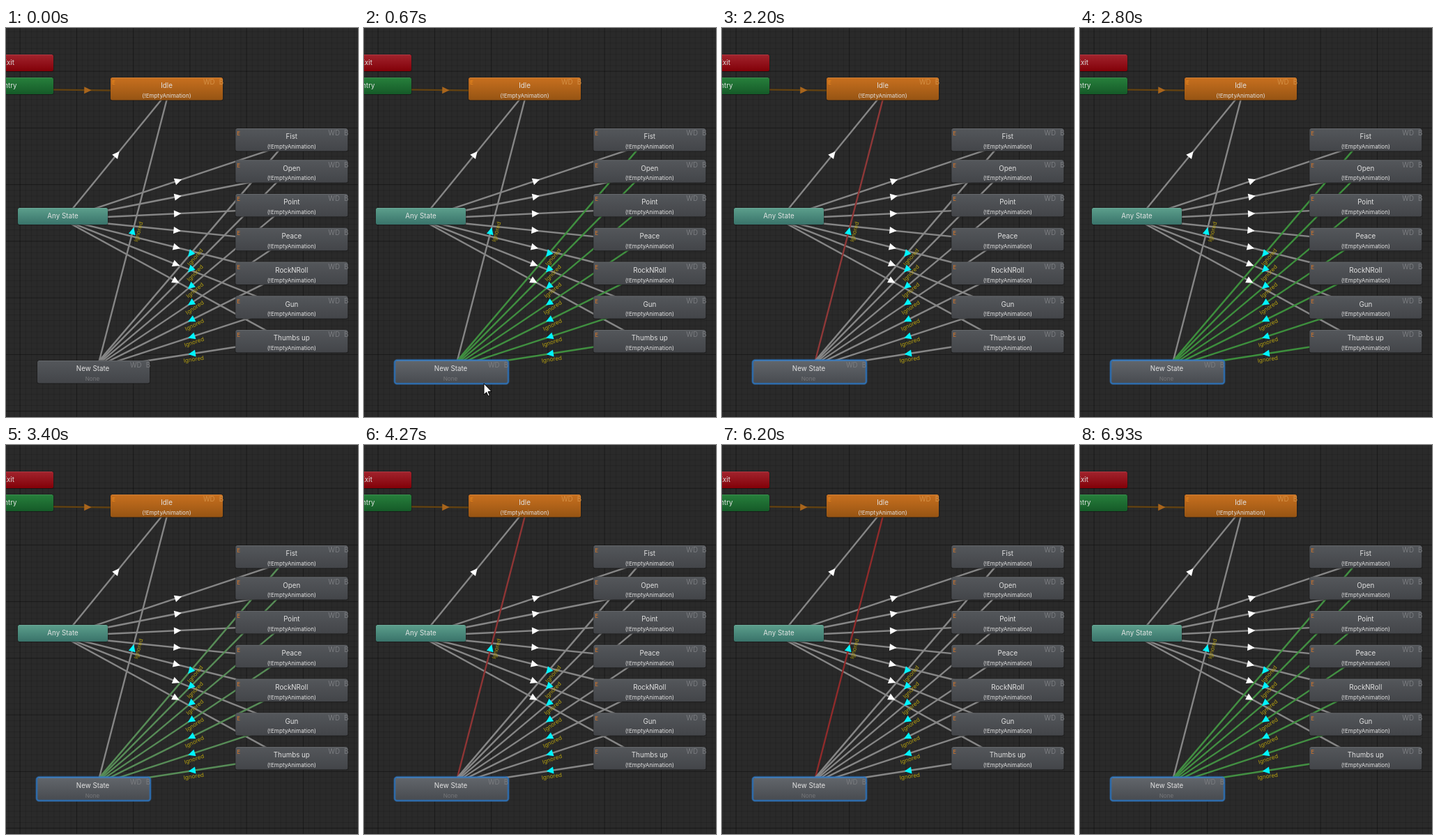
Animation of 505x558 px, one loop 7000 ms. Source, as an HTML page with a canvas:

```html
<!DOCTYPE html>
<html lang="en">
<head>
<meta charset="utf-8">
<title>State graph</title>
<style>
  html, body { margin: 0; width: 100%; height: 100%; overflow: hidden; background: #2a2a2a; }
  canvas { display: block; }
</style>
</head>
<body>
<canvas id="stage" width="505" height="558"></canvas>
<script>
const W = 505, H = 558, LOOP = 7000, STEP = 200 / 3;
const ZOOM = 0.8125;
const SELECT_STEP = 7;
const PULSE = 2094.4, PULSE_START = 376;
const FONT = 'Inter, Roboto, sans-serif';
const GREY = [134, 134, 134], GREEN = [54, 144, 54], RED = [144, 42, 42];
const ctx = document.getElementById('stage').getContext('2d');

const FILLS = {
  grey: ['#54575b', '#434549'],
  lit: ['#62666b', '#484b50'],
  orange: ['#c8701f', '#965413'],
  teal: ['#5c9f8c', '#39736a'],
  green: ['#27803c', '#155a28'],
  red: ['#a2242e', '#820008']
};

const state = (name, x, y, fill = 'grey', sub = '(!EmptyAnimation)') =>
  ({ name, x, y, w: 161, h: 32.5, fill, sub });
const pill = (name, x, y, fill) => ({ name, x, y, w: 129, h: 24, fill });

const idle = state('Idle', 150, 71, 'orange');
const anyState = pill('Any State', 17, 258, 'teal');
const newState = state('New State', 45, 477, 'grey', 'None');
const exit = pill('Exit', -61, 38, 'red');
const entry = pill('Entry', -61, 71, 'green');
const hands = ['Fist', 'Open', 'Point', 'Peace', 'RockNRoll', 'Gun', 'Thumbs up']
  .map((name, i) => state(name, 329.3, i ? 189.3 + (i - 1) * 48.75 : 144));
const nodes = [exit, entry, idle, anyState, newState, ...hands];

const center = n => [n.x + n.w / 2, n.y + n.h / 2];

// An edge joins two centres, shifted to the right of its direction.
function edge(from, to, kind) {
  const [ax, ay] = center(from), [bx, by] = center(to);
  const angle = Math.atan2(by - ay, bx - ax);
  const ox = -Math.sin(angle) * 4.06, oy = Math.cos(angle) * 4.06;
  return { kind, angle, x1: ax + ox, y1: ay + oy, x2: bx + ox, y2: by + oy };
}
const edges = [
  edge(anyState, idle, 'any'),
  ...hands.map(n => edge(anyState, n, 'any')),
  edge(newState, idle, 'out'),
  ...hands.map(n => edge(n, newState, 'in'))
];

const rgb = c => `rgb(${c.map(Math.round).join(',')})`;
const mix = (a, b, k) => a.map((v, i) => v + (b[i] - v) * k);

function text(str, x, y, size, color, align = 'center') {
  ctx.font = `${size}px ${FONT}`;
  ctx.fillStyle = color;
  ctx.textAlign = align;
  ctx.textBaseline = 'alphabetic';
  ctx.fillText(str, x, y + size * 0.36);
}

function line(x1, y1, x2, y2, color, width) {
  ctx.strokeStyle = color;
  ctx.lineWidth = width;
  ctx.beginPath();
  ctx.moveTo(x1, y1);
  ctx.lineTo(x2, y2);
  ctx.stroke();
}

function arrow(x, y, angle, color) {
  ctx.save();
  ctx.translate(x, y);
  ctx.rotate(angle);
  ctx.fillStyle = color;
  ctx.beginPath();
  ctx.moveTo(5.5, 0);
  ctx.lineTo(-4.8, -5);
  ctx.lineTo(-4.8, 5);
  ctx.fill();
  ctx.restore();
}

function gridLines(gap, color) {
  for (let x = 263.9 % gap; x < W; x += gap) line(x, 0, x, H, color, 1);
  for (let y = 143.4 % gap; y < H; y += gap) line(0, y, W, y, color, 1);
}

function drawGrid() {
  ctx.fillStyle = '#2a2a2a';
  ctx.fillRect(0, 0, W, H);
  gridLines(10 * ZOOM, 'rgba(0,0,0,.13)');
  gridLines(100 * ZOOM, 'rgba(0,0,0,.3)');
}

function ignoredLabel(x, y, angle) {
  ctx.save();
  ctx.translate(x, y);
  ctx.rotate(Math.cos(angle) < 0 ? angle - Math.PI : angle);
  text('Ignored', 1, 8, 10 * ZOOM, '#b09c10');
  ctx.restore();
}

function drawEdges(colors) {
  line(60, 88.4, 155, 89.6, '#64420f', 2.4);
  arrow(117, 89.2, 0.01, '#a8651c');
  for (const e of edges) line(e.x1, e.y1, e.x2, e.y2, rgb(colors[e.kind]), 2.4);
  for (const e of edges) {
    const x = (e.x1 + e.x2) / 2, y = (e.y1 + e.y2) / 2;
    arrow(x, y, e.angle, e.kind === 'any' ? '#fff' : '#00f4ff');
    if (e.kind !== 'any') ignoredLabel(x, y, e.angle);
  }
}

function box(x, y, w, h, r) {
  ctx.beginPath();
  ctx.roundRect(x, y, w, h, r);
}

function drawNode(n, selected) {
  const { x, y, w, h } = n;
  const [top, bottom] = FILLS[selected ? 'lit' : n.fill];
  const shade = ctx.createLinearGradient(0, y, 0, y + h);
  shade.addColorStop(0, top);
  shade.addColorStop(1, bottom);

  box(x - 0.5, y - 0.5, w + 1, h + 1.5, 3);
  ctx.fillStyle = 'rgba(15,15,15,.55)';
  ctx.fill();
  box(x, y, w, h, 2.5);
  ctx.fillStyle = shade;
  ctx.fill();
  line(x + 2, y + 0.5, x + w - 2, y + 0.5, 'rgba(255,255,255,.1)', 1);

  if (selected) {
    box(x - 1, y - 0.6, w + 2, h + 1.4, 3.5);
    ctx.strokeStyle = 'rgba(50,130,215,.3)';
    ctx.lineWidth = 3.5;
    ctx.stroke();
    ctx.strokeStyle = '#2f78c2';
    ctx.lineWidth = 1.5;
    ctx.stroke();
  }

  const cx = x + w / 2;
  if (!n.sub) {
    text(n.name, cx, y + 11.8, 12 * ZOOM, '#e0e4e2');
    return;
  }
  const empty = n.sub === 'None', warm = n.fill === 'orange';
  const dim = warm ? '#d49046' : '#7b7d80';
  text(n.name, cx - (empty ? 1 : 0), y + 11.8, 12 * ZOOM, '#e2e2e2');
  text(n.sub, cx - (empty ? 1.5 : 0), y + 26.2, 10 * ZOOM, empty ? '#75777a' : '#e2e2e2');
  text('WD', x + w - 28, y + 6.8, 12 * ZOOM, dim, 'left');
  text('B', x + w - 5.3, y + 6.8, 12 * ZOOM, dim, 'left');
  if (!empty) text('E', x + 2, y + 7.4, 10 * ZOOM, warm ? '#ee8a1c' : '#d9782a', 'left');
}

// Pointer slides in, clicks, then leaves through the bottom edge.
function pointerAt(step) {
  if (step < 1 || step > 11) return null;
  if (step <= 5) {
    const k = 1 - ((5 - step) / 4) ** 2;
    return [222 - 66 * k, 546 - 52 * k];
  }
  const k = Math.max(0, step - 8) / 3;
  return [156 + 36 * k * k, 494 + 36 * k * k];
}

function drawPointer([x, y]) {
  ctx.save();
  ctx.translate(x, y);
  ctx.beginPath();
  [[0, 0], [0, 16], [3.7, 12.6], [6.2, 18], [8.4, 17], [6, 11.7], [11, 11.5]]
    .forEach(p => ctx.lineTo(...p));
  ctx.closePath();
  ctx.fillStyle = '#fff';
  ctx.fill();
  ctx.strokeStyle = '#000';
  ctx.lineWidth = 1;
  ctx.stroke();
  ctx.restore();
}

function render(time) {
  const step = Math.floor((time + 4) / STEP);
  const selected = step >= SELECT_STEP;
  const colors = { any: GREY, in: GREY, out: GREY };
  if (selected) {
    const wave = Math.sin((step * STEP - PULSE_START) / PULSE * 2 * Math.PI);
    const glow = Math.sqrt(Math.abs(wave));
    if (wave > 0) colors.in = mix(GREY, GREEN, glow);
    else colors.out = mix(GREY, RED, glow);
  }
  drawGrid();
  drawEdges(colors);
  for (const n of nodes) drawNode(n, selected && n === newState);
  const pointer = pointerAt(step);
  if (pointer) drawPointer(pointer);
}

const start = performance.now();
function tick() {
  render((performance.now() - start) % LOOP);
  requestAnimationFrame(tick);
}
tick();
</script>
</body>
</html>
```
